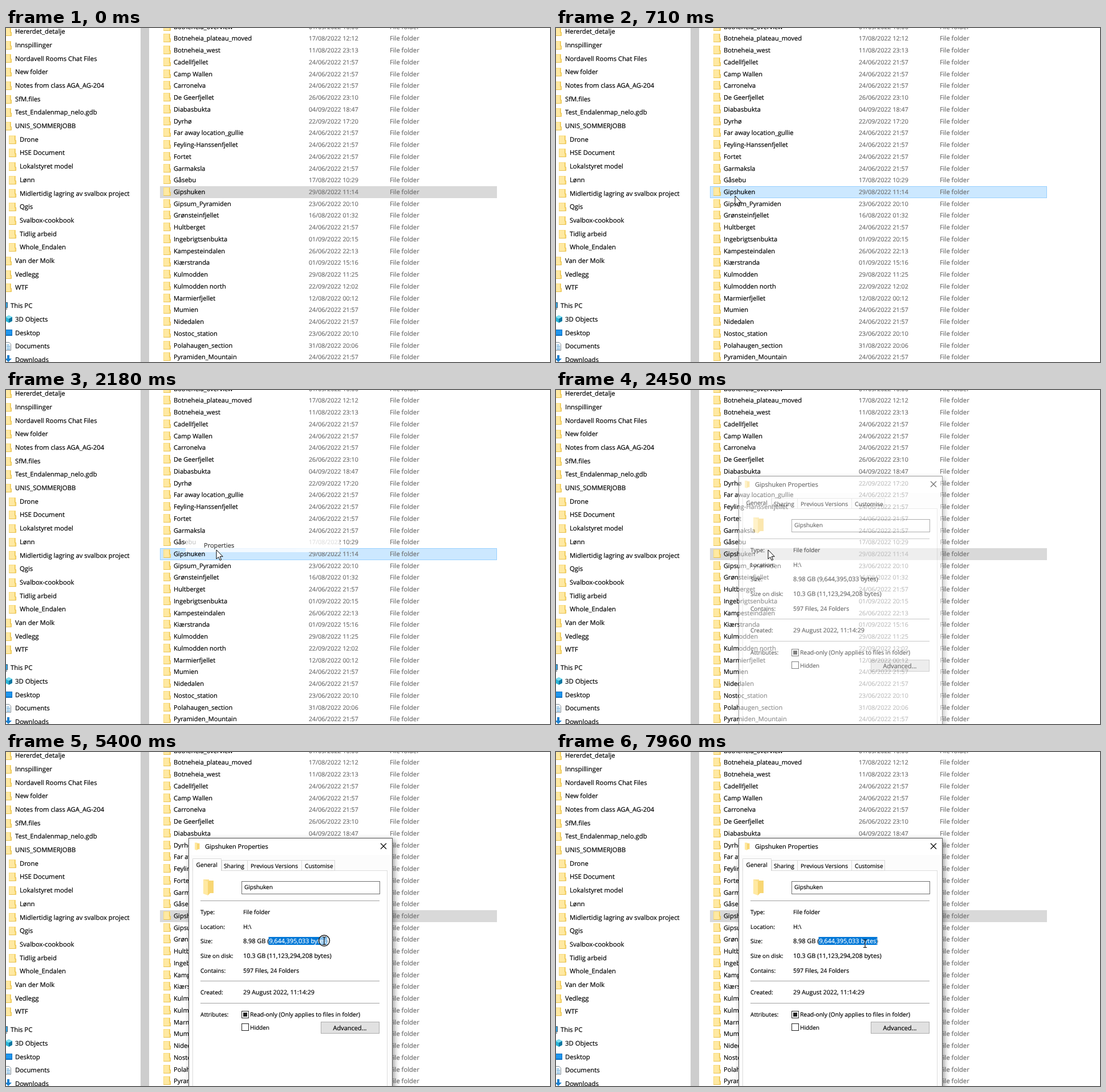
Write an HTML page that moves like this. It is 954 px wide and 587 px high and loops after 8000 ms.

```html
<!DOCTYPE html>
<html lang="en">
<head>
<meta charset="utf-8">
<title>Folder properties</title>
<style>
html, body { margin: 0; width: 100%; height: 100%; overflow: hidden; background: #fff; }
svg { display: block; width: 954px; height: 587px; }
text { font-family: "Open Sans", "Noto Sans", sans-serif; text-rendering: geometricPrecision; white-space: pre; stroke-width: .2px; }
#menu { filter: drop-shadow(3px 3px 1.5px #0007); }
#dialog { filter: drop-shadow(3px 3px 5px #0006); }
</style>
</head>
<body>
<svg id="stage" viewBox="0 0 954 587"></svg>
<script>
const LOOP = 8000, ROW = 20.74, TOP = 8.4, PICKED = 13;
const places = `Botneheia_overview|01/09/2022 16:06
Botneheia_plateau_moved|17/08/2022 12:12
Botneheia_west|11/08/2022 23:13
Cadellfjellet|24/06/2022 21:57
Camp Wallen|24/06/2022 21:57
Carronelva|24/06/2022 21:57
De Geerfjellet|26/06/2022 23:10
Diabasbukta|04/09/2022 18:47
Dyrhø|22/09/2022 17:20
Far away location_gullie|24/06/2022 21:57
Feyling-Hanssenfjellet|24/06/2022 21:57
Fortet|24/06/2022 21:57
Garmaksla|24/06/2022 21:57
Gåsebu|17/08/2022 10:29
Gipshuken|29/08/2022 11:14
Gipsum_Pyramiden|23/06/2022 20:10
Grønsteinfjellet|16/08/2022 01:32
Hultberget|24/06/2022 21:57
Ingebrigtsenbukta|01/09/2022 20:15
Kampesteindalen|26/06/2022 22:13
Kiærstranda|01/09/2022 15:16
Kulmodden|29/08/2022 11:25
Kulmodden north|22/09/2022 12:02
Marmierfjellet|12/08/2022 00:12
Mumien|24/06/2022 21:57
Nidedalen|24/06/2022 21:57
Nostoc_station|23/06/2022 20:10
Polahaugen_section|31/08/2022 20:06
Pyramiden_Mountain|24/06/2022 21:57`.split('\n');

// A leading dash marks a nested folder.
const tree = `Hererdet_detalje
Innspillinger
Nordavell Rooms Chat Files
New folder
Notes from class AGA_AG-204
SfM.files
Test_Endalenmap_nelo.gdb
UNIS_SOMMERJOBB
-Drone
-HSE Document
-Lokalstyret model
-Lønn
-Midlertidig lagring av svalbox project
-Qgis
-Svalbox-cookbook
-Tidlig arbeid
-Whole_Endalen
Van der Molk
Vedlegg
WTF`.split('\n');

const text = (x, y, s, size = 11.1, fill = '#000', extra = '') =>
  `<text x="${x}" y="${Math.round(y)}" font-size="${size}" fill="${fill}" stroke="${fill}" ${extra}>${s}</text>`;
const rect = (x, y, w, h, fill, extra = '') =>
  `<rect x="${x}" y="${y}" width="${w}" height="${h}" fill="${fill}" ${extra}/>`;
const box = (x, y, w, h, fill, line) => rect(x + .5, y + .5, w - 1, h - 1, fill, `stroke="${line}"`);
const path = (d, fill, extra = '') => `<path d="${d}" fill="${fill}" ${extra}/>`;
const folder = (x, y) => `<g transform="translate(${x} ${y})">` +
  rect(0, 0, 12, 15, '#fbdc7c') + rect(1, 1, 9, 13, '#ffe9a2') +
  path('M.5 14.5H12.5V8.5H10.5V.5', 'none', 'stroke="#e8c14e"') + '</g>';
const openFolder = (x, y, k) => `<g transform="translate(${x} ${y}) scale(${k})">` +
  path('M0 1H10V26H0Z', '#fbe08d') + path('M8 5 10 3H18V25H12L8 29Z', '#f8d673') +
  path('M0 1 8 5V29L0 26Z', '#ffe9a2') + '</g>';

function sidebar() {
  let out = rect(236, 0, 15, 587, '#cdcdcd');
  tree.forEach((name, i) => {
    const y = 6 + i * 23.7, deep = name[0] === '-';
    out += folder(deep ? 5 : -3, Math.round(y - 7)) + text(deep ? 24 : 16, y + 4.1, name.replace(/^-/, ''), 11.3);
  });
  ['This PC', '3D Objects', 'Desktop', 'Documents', 'Downloads'].forEach((name, i) =>
    out += text(i ? 16 : 8, 492.1 + i * 23.7, name, 11.3));
  return out + box(-9, 482, 12, 10, '#39a9e8', '#36566b') + rect(-8, 493, 10, 1.5, '#5a6b76') +
    path('M-1 508 5 505 11 508V515L5 518-1 515Z', '#29b6d8') + path('M-1 508 5 505 11 508 5 511Z', '#7fe0f2') +
    path('M5 511 11 508V515L5 518Z', '#1277a0') +
    rect(-1, 530, 12, 11, '#0a6fc2') + rect(0, 531, 10, 8, '#1e96ee') +
    path('M-1 552.5H5.5L8.5 555.5V566.5H-1Z', '#fff', 'stroke="#7d8a94"') +
    path('M1 557H6M1 559.5H7M1 562H7M1 564.5H7', 'none', 'stroke="#3a92cf"') +
    path('M2 575H6V581H10L4 587-2 581H2Z', '#1b80d0');
}

function list() {
  return places.map((line, i) => {
    const [name, date] = line.split('|'), y = 22.4 + (i - 1) * ROW;
    return folder(276, Math.round(y - 12)) + text(294, y, name) +
      text(531, y, date, 10.7, '#6d6d6d') + text(673, y, 'File folder', 11.2, '#6d6d6d');
  }).join('');
}

function menu() {
  const items = { 14: 'Restore previous versions', 43: 'Combine files in Pagemar...', 71: 'Include in library',
    93: 'Pin to Start', 121: 'Send to', 150: 'Cut', 172: 'Copy', 201: 'Create shortcut', 222: 'Delete', 244: 'Rename' };
  let out = box(313, -5, 275, 294, '#eeeeee', '#a3a3a3');
  for (const y in items) out += text(347, +y + 3.9, items[y], 11.05);
  for (const y of [28, 57, 107, 135, 186, 258]) out += rect(323, y, 254, 1, '#919191');
  for (const y of [71, 121]) out += path(`M569 ${y - 6}l6 6-6 6`, 'none', 'stroke="#333" stroke-width="1.1"');
  return out + rect(325, 35, 16, 16, '#c8262c');
}

const sizeText = '8.98 GB (9,644,395,033 bytes)';
function dialog() {
  const rows = [[285, 'Type:', 'File folder', 10.2], [311, 'Location:', 'H:\\', 10.5], [336, 'Size:', sizeText, 10.88],
    [362, 'Size on disk:', '10.3 GB (11,123,294,208 bytes)', 10.87], [388, 'Contains:', '597 Files, 24 Folders', 10.45],
    [426, 'Created:', '29 August 2022, 11:14:29', 10.72], [465, 'Attributes:', '', 10]];
  let out = box(320, 151, 358, 460, '#fcfcfc', '#555') + rect(321, 152, 356, 29, '#fff') +
    openFolder(331, 159, .47) + text(349, 170, 'Gipshuken Properties', 11) +
    path('M657 160.5l10 10m0-10l-10 10', 'none', 'stroke="#000" stroke-width="1.1"') +
    box(327, 208, 342, 400, '#fff', '#dcdcdc');
  for (const [x, w, name] of [[378, 46, 'Sharing'], [423, 96, 'Previous Versions'], [518, 59, 'Customise']])
    out += box(x, 190, w, 19, '#fcfcfc', '#d9d9d9') + text(x + (x > 400 ? 6 : 4), 203.5, name, 10.15);
  out += path('M327.5 209V187.5H377.5V209', '#fff', 'stroke="#d9d9d9"') + text(333.5, 202, 'General', 10.2) +
    openFolder(346, 223, 1) + box(413, 227, 243, 23, '#fff', '#6f6f6f') + text(418, 241, 'Gipshuken', 10);
  for (const y of [261, 402, 441]) out += rect(341, y, 314, 1, '#a0a0a0');
  for (const [y, label, value, size] of rows) out += text(341, y, label, 10.1) + text(416, y, value, size);
  return out + box(413, 455, 13, 13, '#fff', '#222') + rect(416, 458, 7, 7, '#222') +
    text(428, 465, 'Read-only (Only applies to files in folder)', 10.3) +
    box(413, 477, 13, 13, '#fff', '#222') + text(428, 488, 'Hidden', 10) +
    box(552, 474, 103, 21, '#e1e1e1', '#adadad') + text(603, 489, 'Advanced...', 11, '#000', 'text-anchor="middle"');
}

const stage = document.getElementById('stage');
stage.innerHTML = `<clipPath id="clip">${rect(460.5, 325, 0, 15, '#000', 'id="clipBox"')}</clipPath>` +
  rect(0, 0, 954, 587, '#fff') + rect(270, 0, 591, 21, '#e5f3ff', 'id="hover"') +
  rect(270.5, 278.5, 590, 20, '#d9d9d9', 'id="picked"') + sidebar() + list() +
  `<g id="menu">${menu()}</g>` +
  `<g id="item">${rect(315, 262, 270, 23, '#fff', 'id="itemBack"')}${text(347, 276.9, 'Properties', 11.05)}</g>` +
  `<g id="dialog">${dialog()}</g>` +
  `<g clip-path="url(#clip)">${rect(460, 325, 110, 14, '#0078d7')}${text(416, 336, sizeText, 10.88, '#fff')}</g>` +
  '<circle id="ring" r="9.5" fill="#fff" fill-opacity=".5" stroke="#222" stroke-width="1.5"/>' +
  path('M0 0V16L3.7 12.6 6.2 18.3 8.6 17.3 6.2 11.7H11.2Z', '#fff', 'id="arrow" stroke="#000"') +
  path('M-3-6.5H-1Q0-6.5 0-5.5Q0-6.5 1-6.5H3M0-6V6.5M-3 7H-1Q0 7 0 6Q0 7 1 7H3', 'none', 'id="beam" stroke="#000" stroke-width="1.1"');

const el = id => document.getElementById(id);
const [hover, picked, menuBox, item, itemBack, dialogBox, clipBox, ring, arrow, beam] =
  ['hover', 'picked', 'menu', 'item', 'itemBack', 'dialog', 'clipBox', 'ring', 'arrow', 'beam'].map(el);

// Pointer track: time, x, y
const track = [[240, 277, 572], [440, 286, 349], [710, 314, 295], [1130, 314, 295], [1260, 316, 290], [1400, 325, 288],
  [1750, 369, 280], [2180, 369, 281], [2450, 372, 281], [2760, 372, 281], [3180, 408, 328], [3510, 450, 335],
  [3630, 477, 335], [3850, 477, 335], [4230, 460, 334.5], [4520, 460, 334.5], [5340, 557, 332.5], [5400, 558, 331.5],
  [5720, 561, 332], [6030, 561, 332], [6600, 457, 335], [6740, 457, 336], [6900, 465, 336], [7320, 558, 335],
  [7720, 503, 336], [7960, 542, 336.5]];
const clamp = v => Math.max(0, Math.min(1, v));
const show = (node, on) => node.setAttribute('visibility', on ? 'visible' : 'hidden');
const within = (t, from, to) => t >= from && t < to;

function pointer(t) {
  let i = 1;
  while (i < track.length - 1 && track[i][0] < t) i++;
  const [a, b] = [track[i - 1], track[i]], k = clamp((t - a[0]) / (b[0] - a[0]));
  return [a[1] + (b[1] - a[1]) * k, a[2] + (b[2] - a[2]) * k];
}

function draw(t) {
  const [x, y] = pointer(t), row = Math.floor((y - TOP) / ROW);
  show(hover, within(t, 240, 900) && row > PICKED);
  hover.setAttribute('y', Math.round(TOP + row * ROW));

  const active = within(t, 240, 2420) && (t > 900 || row === PICKED);
  picked.setAttribute('fill', active ? '#cce8ff' : '#d9d9d9');
  picked.setAttribute('stroke', active ? '#99d1ff' : '#d9d9d9');

  const opening = clamp((t - 1080) / 130);
  show(menuBox, within(t, 1080, 2070));
  menuBox.setAttribute('opacity', opening);
  show(item, within(t, 1080, 2400));
  item.setAttribute('opacity', t < 2070 ? opening : 1 - clamp((t - 2120) / 280));
  itemBack.setAttribute('fill-opacity', t > 1400 && y < 285 ? 1 : 0);

  show(dialogBox, t >= 2420);
  dialogBox.setAttribute('opacity', clamp((t - 2400) / 90));

  const end = t < 4520 ? 460.5 : t < 5400 ? 460.5 + Math.round((x - 460.5) / 6) * 6 : 563.5;
  clipBox.setAttribute('width', Math.max(0, end - 460.5));

  show(ring, within(t, 960, 1130) || within(t, 1810, 2000) || within(t, 4420, 5720));
  const typing = t > 2500 && x > 415;
  show(arrow, t >= 240 && !typing);
  show(beam, typing);
  for (const node of [ring, arrow, beam]) node.setAttribute('transform', `translate(${x} ${y})`);
}

const start = performance.now();
(function tick() {
  draw((performance.now() - start) % LOOP);
  requestAnimationFrame(tick);
})();
</script>
</body>
</html>
```
